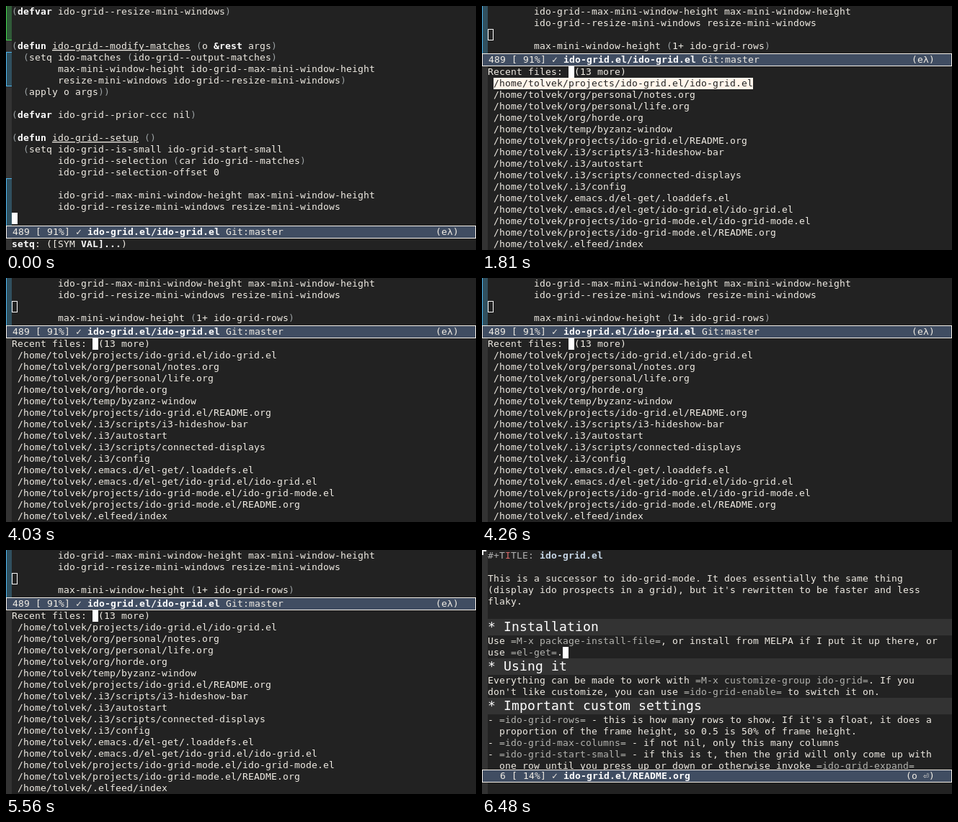
Write an HTML page that moves like this. It is 652 px wide and 340 px high and loops after 9.9 s.

```html
<!DOCTYPE html>
<html lang="en">
<head>
<meta charset="utf-8">
<title>ido-grid</title>
<style>
  html, body { margin: 0; width: 100%; height: 100%; overflow: hidden; background: #222; }
  svg { display: block; width: 652px; height: 340px; }
  text { font: 13px "DejaVu Sans Mono", monospace; fill: #f0ece4; white-space: pre; }
  .head { font-size: 18px; fill: #fff; }
  .b { font-weight: bold; fill: #fff; }
  .u { text-decoration: underline; }
  .dim { fill: #9aa0a2; }
  .verb { fill: #b4b4b0; }
  .meta { fill: #b0b0b0; }
  .title { font-weight: bold; fill: #c6d6e6; }
  .red { fill: #d86a6a; }
  .picked { fill: #222; }
</style>
</head>
<body>
<svg id="stage" viewBox="0 0 652 340" xmlns="http://www.w3.org/2000/svg"></svg>
<script>
const LOOP = 9900;
const stage = document.getElementById('stage');
const timed = [];

const span = (cls, s) => `<tspan class="${cls}">${s}</tspan>`;
const rect = (x, y, w, h, fill) => `<rect x="${x}" y="${y}" width="${w}" height="${h}" fill="${fill}"/>`;
const escape = s => s.replace(/&/g, '&amp;');

// **bold** and __underlined__ marks
const rich = s => escape(s)
  .replace(/\*\*(.+?)\*\*/g, (_, t) => span('b', t))
  .replace(/__(.+?)__/g, (_, t) => span('u', t));
const lisp = s => rich(s).replace(/[()]/g, p => span('dim', p));
const org = s => escape(s).replace(/=.+?=/g, t => span('verb', t));

// terminal grid: round each advance to whole pixels
function gridGap(cls) {
  stage.innerHTML = `<text class="${cls}">${'m'.repeat(50)}</text>`;
  const advance = stage.firstChild.getComputedTextLength() / 50;
  return Math.round(advance) - advance;
}
const gaps = { body: gridGap(''), head: gridGap('head') };

const text = (x, y, body, cls = '', base = 12) =>
  `<text xml:space="preserve" class="${cls}" x="${x}" y="${y + base}" ` +
  `letter-spacing="${(gaps[cls] ?? gaps.body).toFixed(4)}">${body}</text>`;
const lines = (y, list, format) =>
  list.map((s, i) => s && text(8, y + i * 16, format(s))).join('');

const modeLine = (y, place, file, rest, tag) =>
  rect(0, y, 652, 18, '#f4efe8') + rect(1, y + 1, 650, 16, '#404d62') +
  text(9, y + 1, place) + text(97, y + 1, '✓') +
  text(113, y + 1, span('b', file) + rest) +
  text(628 - tag.length * 8, y + 1, tag);

// fringe mark; top and bottom edges are optional
function mark(y, h, edge, fill, top, bottom) {
  return rect(0, y, 8, h, fill) + rect(0, y, 1, h, edge) +
    (top ? rect(0, y, 8, 1, edge) : '') +
    (bottom ? rect(0, y + h - 1, 8, 1, edge) : '');
}
const BLUE = ['#4db4ea', '#30505f'];
const GREEN = ['#3fd04a', '#305a38'];

function show(from, to, body) {
  const g = document.createElementNS(stage.namespaceURI, 'g');
  g.innerHTML = body;
  stage.append(g);
  timed.push({ g, from, to });
}

const saved = [
  '        ido-grid--max-mini-window-height max-mini-window-height',
  '        ido-grid--resize-mini-windows resize-mini-windows'
];
const code = [
  '(**defvar** ido-grid--resize-mini-windows)',
  '',
  '',
  '(**defun** __ido-grid--modify-matches__ (o **&rest** args)',
  '  (setq ido-matches (ido-grid--output-matches)',
  '        max-mini-window-height ido-grid--max-mini-window-height',
  '        resize-mini-windows ido-grid--resize-mini-windows)',
  '  (apply o args))',
  '',
  '(**defvar** ido-grid--prior-ccc nil)',
  '',
  '(**defun** __ido-grid--setup__ ()',
  '  (setq ido-grid--is-small ido-grid-start-small',
  '        ido-grid--selection (car ido-grid--matches)',
  '        ido-grid--selection-offset 0',
  '',
  ...saved
];
const files = [
  'projects/ido-grid.el/ido-grid.el',
  'org/personal/notes.org',
  'org/personal/life.org',
  'org/horde.org',
  'temp/byzanz-window',
  'projects/ido-grid.el/README.org',
  '.i3/scripts/i3-hideshow-bar',
  '.i3/autostart',
  '.i3/scripts/connected-displays',
  '.i3/config',
  '.emacs.d/el-get/.loaddefs.el',
  '.emacs.d/el-get/ido-grid.el/ido-grid.el',
  'projects/ido-grid-mode.el/ido-grid-mode.el',
  'projects/ido-grid-mode.el/README.org',
  '.elfeed/index'
].map(f => '/home/tolvek/' + f);

const codeMode = y => modeLine(y, '489 [ 91%]', 'ido-grid.el/ido-grid.el', ' Git:master', '(eλ)');

stage.innerHTML = rect(0, 0, 652, 340, '#222') + rect(0, 0, 8, 340, '#333');

// code buffer
show(0, 1750,
  mark(0, 48, ...GREEN, false, true) + mark(64, 48, ...BLUE, true, true) +
  mark(240, 66, ...BLUE, true, false) +
  lines(0, code, lisp) + rect(8, 288, 8, 16, '#fff') + codeMode(306));

// echo area
const hint = ': ([SYM **VAL]...**)';
show(0, 1390, text(8, 324, rich('**setq**' + hint)));
show(1390, 1430, text(16, 324, rich('**etq**' + hint)));
show(1570, 1750, text(8, 324, 'C-x-'));

// recent files prompt
show(1750, 6480,
  mark(0, 66, ...BLUE, false, false) +
  lines(0, [...saved, '', '        max-mini-window-height (1+ ido-grid-rows)'], lisp) +
  '<rect x="8.5" y="32.5" width="7" height="15" fill="none" stroke="#fff"/>' +
  codeMode(66) +
  text(8, 84, 'Recent files: ') + rect(120, 84, 8, 16, '#fff') + text(128, 84, '(13 more)') +
  lines(100, files.map(f => ' ' + f), escape));

// selection bar: [from, to] for each row in turn
[[1810, 3240], [3240, 4030], [4070, 4260], [4300, 4460], [4500, 5560], [5600, 6420]]
  .forEach(([from, to], i) => {
    const y = 100 + i * 16;
    show(from, to,
      rect(16, y, files[i].length * 8, 16, '#fff5ea') + text(16, y, files[i], 'picked'));
  });

// org buffer
const heading = (y, s) => rect(8, y, 644, 23, '#333') + text(8, y, '* ' + s, 'head', 17);
show(6480, LOOP,
  '<path d="M1 7V1H6" fill="none" stroke="#eee" stroke-width="2"/>' +
  text(8, 0, span('meta', '#+T' + span('red', 'I') + 'TLE: ') + span('title', 'ido-grid.el')) +
  lines(32, [
    'This is a successor to ido-grid-mode. It does essentially the same thing',
    "(display ido prospects in a grid), but it's rewritten to be faster and less",
    'flaky.'
  ], org) +
  heading(96, 'Installation') +
  lines(119, [
    'Use =M-x package-install-file=, or install from MELPA if I put it up there, or',
    'use =el-get=.'
  ], org) +
  rect(112, 135, 8, 16, '#fff') +
  heading(151, 'Using it') +
  lines(174, [
    'Everything can be made to work with =M-x customize-group ido-grid=. If you',
    "don't like customize, you can use =ido-grid-enable= to switch it on."
  ], org) +
  heading(206, 'Important custom settings') +
  lines(229, [
    "- =ido-grid-rows= - this is how many rows to show. If it's a float, it does a",
    '  proportion of the frame height, so 0.5 is 50% of frame height.',
    '- =ido-grid-max-columns= - if not nil, only this many columns',
    '- =ido-grid-start-small= - if this is t, then the grid will only come up with',
    '  one row until you press up or down or otherwise invoke =ido-grid-expand='
  ], org) +
  modeLine(306, '  6 [ 14%]', 'ido-grid.el/README.org', '', '(o ⏎)'));

const start = performance.now();
function draw() {
  const t = (performance.now() - start) % LOOP;
  for (const { g, from, to } of timed) g.style.display = t >= from && t < to ? '' : 'none';
  requestAnimationFrame(draw);
}
draw();
</script>
</body>
</html>
```
